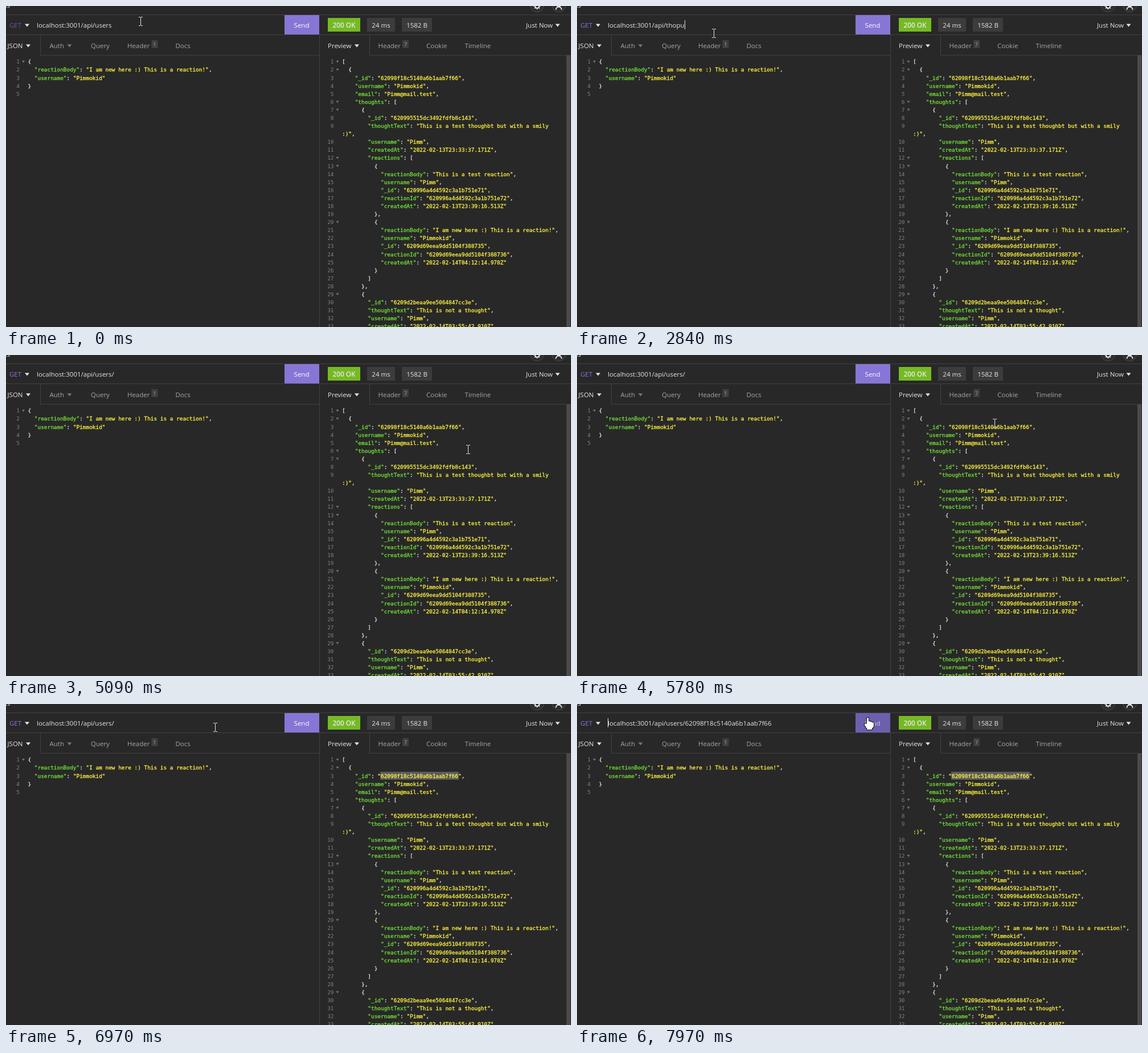
An HTML page with a canvas that plays this animation: 992 px wide and 564 px high, repeating every 8 s.

```html
<!DOCTYPE html>
<html lang="en">
<head>
<meta charset="utf-8">
<title>API client</title>
<style>
  html, body { margin: 0; width: 100%; height: 100%; overflow: hidden; background: #282828; }
  canvas { display: block; }
</style>
</head>
<body>
<canvas id="stage" width="992" height="564"></canvas>
<script>
const ctx = document.getElementById('stage').getContext('2d');
const LOOP = 8000;
const UI = '11.5px "Open Sans", "Noto Sans", sans-serif';
const UI_BOLD = '600 11.8px "Open Sans", "Noto Sans", sans-serif';
const BADGE = '9px "Open Sans", "Noto Sans", sans-serif';
const CODE = '9.42px "DejaVu Sans Mono", "Liberation Mono", monospace';
const CHAR = 5.67, ROW = 14.09, TOP = 98, SPLIT = 550;
const BAR = 16, TABS = 50, BODY = 87;
const COLOR = {
  bg: '#282828', line: '#414141', text: '#e6e6e6', dim: '#a6a6a6', num: '#808080',
  key: '#74e238', str: '#fff440', purple: '#8776d5', hover: '#6d5fae',
  green: '#75ba24', chip: '#3c3c3c', select: '#5b5b5b'
};

const ID = '62098f18c5140a6b1aab7f66';
const BASE = 'localhost:3001/api/';

const request = `{
  "reactionBody": "I am new here :) This is a reaction!",
  "username": "Pimmokid"
}
`.split('\n');

const response = `[
  {
    "_id": "${ID}",
    "username": "Pimmokid",
    "email": "Pimm@mail.test",
    "thoughts": [
      {
        "_id": "620995515dc3492fdfb8c143",
        "thoughtText": "This is a test thoughbt but with a smily
:)",
        "username": "Pimm",
        "createdAt": "2022-02-13T23:33:37.171Z",
        "reactions": [
          {
            "reactionBody": "This is a test reaction",
            "username": "Pimm",
            "_id": "620996a4d4592c3a1b751e71",
            "reactionId": "620996a4d4592c3a1b751e72",
            "createdAt": "2022-02-13T23:39:16.513Z"
          },
          {
            "reactionBody": "I am new here :) This is a reaction!",
            "username": "Pimmokid",
            "_id": "6209d69eea9dd5104f388735",
            "reactionId": "6209d69eea9dd5104f388736",
            "createdAt": "2022-02-14T04:12:14.978Z"
          }
        ]
      },
      {
        "_id": "6209d2beaa9ee5064847cc3e",
        "thoughtText": "This is not a thought",
        "username": "Pimm",
        "createdAt": "2022-02-14T03:55:42.910Z",`.split('\n');

// Typing bursts: letters shown grow or shrink evenly between start and end
const bursts = [
  { start: 0, word: 'users', to: 5 },
  { start: 1340, end: 2010, word: 'thopught', from: 2, to: 8 },
  { start: 2310, word: 'thopught', to: 7 },
  { start: 2810, end: 3040, word: 'thopught', from: 6, to: 1 },
  { start: 3200, word: '', to: 0 },
  { start: 3560, end: 4370, word: 'users/', from: 2, to: 6 },
  { start: 7210, word: 'users/' + ID, to: 30 }
];

// Pointer moves: [start, end, x, y]
const moves = [
  [460, 690, 240, 48], [4830, 4940, 346, 20], [4940, 5090, 811, 166],
  [5090, 5580, 733, 114], [5660, 5910, 733, 127], [6420, 6450, 700, 127],
  [6450, 7020, 336, 33], [7210, 7570, 428, 73], [7570, 7700, 452, 80],
  [7700, 7970, 510, 24]
];

const clamp01 = v => Math.min(1, Math.max(0, v));
const mix = (a, b, k) => a + (b - a) * k;

function textWidth(s) {
  ctx.font = UI;
  return ctx.measureText(s).width;
}

function label(s, x, y, color = COLOR.text, font = UI, align = 'left') {
  ctx.font = font;
  ctx.fillStyle = color;
  ctx.textAlign = align;
  ctx.fillText(s, x, y);
}

function box(x, y, w, h, color) {
  ctx.fillStyle = color;
  ctx.fillRect(x, y, w, h);
}

function triangle(x, y, w, h, color) {
  ctx.fillStyle = color;
  ctx.beginPath();
  ctx.moveTo(x - w / 2, y - h / 2);
  ctx.lineTo(x + w / 2, y - h / 2);
  ctx.lineTo(x, y + h / 2);
  ctx.fill();
}

function codeRow(s, x, y) {
  const token = /^:\)"|"[^"]*"?|[^"\s]+/g;
  for (const m of s.matchAll(token)) {
    const isKey = s[m.index + m[0].length] === ':';
    const color = !m[0].includes('"') ? COLOR.text : isKey ? COLOR.key : COLOR.str;
    const left = x + m.index * CHAR;
    label(m[0], left, y, color, CODE);
    ctx.strokeStyle = color;
    ctx.lineWidth = 0.3;
    ctx.strokeText(m[0], left, y);
  }
}

function editor(rows, x) {
  let n = 0;
  rows.forEach((s, i) => {
    const mid = TOP + i * ROW, y = Math.round(mid + 3.4);
    codeRow(s, x, y);
    if (s.startsWith(':)')) return;
    label(++n, x - 14.5, y, COLOR.num, CODE, 'right');
    if (/[{[]$/.test(s)) triangle(x - 8, mid, 5, 4, '#737373');
  });
}

function disc(x) {
  ctx.beginPath();
  ctx.arc(x, -1.5, 12, 0, 7);
  ctx.fillStyle = '#2d2d2d';
  ctx.fill();
  ctx.strokeStyle = '#4d4d4d';
  ctx.lineWidth = 1;
  ctx.stroke();
  ctx.strokeStyle = COLOR.text;
  ctx.lineWidth = 2;
  ctx.beginPath();
}

function gear(x) {
  disc(x);
  ctx.arc(x, 0, 3.6, 0, 7);
  for (let a = 0; a < 6; a += Math.PI / 4) {
    ctx.moveTo(x + Math.cos(a) * 4, Math.sin(a) * 4);
    ctx.lineTo(x + Math.cos(a) * 6, Math.sin(a) * 6);
  }
  ctx.stroke();
}

function person(x) {
  disc(x);
  ctx.arc(x, -2, 3, 0, 7);
  ctx.stroke();
  ctx.beginPath();
  ctx.arc(x, 6.5, 5, Math.PI, 0);
  ctx.stroke();
}

// Lays tabs out from left to right; a mark is a caret (v) or a count
function tabRow(x, tabs) {
  tabs.forEach(([name, mark], i) => {
    const color = i ? COLOR.dim : COLOR.text;
    label(name, x, 74, color);
    x += textWidth(name);
    if (mark === 'v') {
      triangle(x + 9.5, 70, 8, 5, i ? '#777' : color);
      x += 16;
    } else if (mark) {
      box(x + 3, 60, 11, 14, '#3f3f3f');
      label(mark, x + 8.5, 70.5, COLOR.dim, BADGE, 'center');
      x += 14;
    }
    x += 31;
  });
}

function tabLines(x, right) {
  box(x, TABS, 1, BODY - TABS, COLOR.line);
  box(x, BODY - 1, right - x, 1, COLOR.line);
}

function chip(s, x, w, color, font) {
  box(x, 21, w, 24, color);
  label(s, x + w / 2, 38, COLOR.text, font, 'center');
}

function frame() {
  box(0, 0, 992, 564, COLOR.bg);
  gear(932.5);
  person(970.5);
  label('ns', 7, 3, COLOR.text, UI, 'right');
  box(0, BAR - 1, 992, 1, COLOR.line);
  box(0, TABS, 992, 1, COLOR.line);
  box(SPLIT, TABS, 1, 514, COLOR.line);
  tabLines(60, SPLIT);
  tabLines(638, 992);
  box(984, BODY, 7, 477, '#4b4b4b');

  chip('200 OK', 565, 57, COLOR.green, UI_BOLD);
  chip('24 ms', 634, 49, COLOR.chip);
  chip('1582 B', 695, 53, COLOR.chip);
  label('Just Now', 913, 38);
  triangle(968.5, 34, 8, 5, COLOR.text);
  tabRow(2.5, [['JSON', 'v'], ['Auth', 'v'], ['Query'], ['Header', '1'], ['Docs']]);
  tabRow(565, [['Preview', 'v'], ['Header', '7'], ['Cookie'], ['Timeline']]);
}

function typed(t) {
  const { start, end, word, from = 0, to } = bursts.filter(b => b.start <= t).pop();
  const k = end ? clamp01((t - start) / (end - start)) : 1;
  return word.slice(0, Math.floor(mix(from, to, k)));
}

function address(t) {
  const tail = typed(t);
  const baseW = textWidth(BASE), fullW = textWidth(BASE + tail);
  const picked = t >= 690 && t < 1340;
  label('GET', 6, 38, t < 460 ? '#6457a3' : COLOR.purple);
  triangle(37, 34, 8, 5, COLOR.text);
  if (picked) box(54 + baseW, 25, fullW - baseW, 16, COLOR.select);
  label(BASE + tail, 54, 38);
  const focused = (t >= 580 && t < 4830 && !picked) || t >= 7020;
  if (focused) box(t >= 7960 ? 54 : Math.round(54 + fullW), 25, 1, 16, COLOR.text);
}

function pointerAt(t) {
  let x = 236, y = 27;
  for (const [start, end, toX, toY] of moves) {
    const k = clamp01((t - start) / (end - start));
    x = mix(x, toX, k);
    y = mix(y, toY, k);
  }
  return [x, y];
}

function ibeam(x, y) {
  x = Math.round(x);
  y = Math.round(y);
  box(x, y - 7, 1, 14, COLOR.text);
  for (const dy of [-8, 7]) {
    box(x - 3, y + dy, 3, 1, COLOR.text);
    box(x + 1, y + dy, 3, 1, COLOR.text);
  }
}

function arrow(x, y) {
  ctx.beginPath();
  ctx.moveTo(x, y);
  ctx.lineTo(x, y + 15);
  ctx.lineTo(x + 3.5, y + 12);
  ctx.lineTo(x + 6, y + 17.5);
  ctx.lineTo(x + 8.5, y + 16.5);
  ctx.lineTo(x + 6, y + 11);
  ctx.lineTo(x + 10.5, y + 11);
  ctx.closePath();
  ctx.fillStyle = '#fff';
  ctx.strokeStyle = '#111';
  ctx.lineWidth = 1;
  ctx.fill();
  ctx.stroke();
}

// Black pass one pixel larger gives the outline
function hand(x, y) {
  for (const [grow, color] of [[1, '#111'], [0, '#fff']]) {
    ctx.fillStyle = color;
    const part = (dx, dy, w, h) => {
      ctx.beginPath();
      ctx.roundRect(x + dx - grow, y + dy - grow, w + 2 * grow, h + 2 * grow, 1.5 + grow);
      ctx.fill();
    };
    part(-1, 0, 3, 14);
    for (let i = 1; i < 4; i++) part(i * 3 - 1, 5 + i, 3, 8);
    part(-5, 10, 4, 5);
    part(-3, 11, 13, 7);
    part(-1, 15, 9, 6);
  }
}

function pointer(t, x, y, onSend) {
  const inField = y >= BAR && y < TABS && x > SPLIT - 500;
  const overPick = t >= 6200 && t < 6520;
  if (onSend) hand(x, y);
  else if (!overPick && (inField || y > BODY)) ibeam(x, y);
  else arrow(x, y);
}

function draw(t) {
  const [x, y] = pointerAt(t);
  const onSend = x >= 489 && x < SPLIT && y >= BAR && y < TABS;
  frame();
  address(t);
  box(489, BAR, SPLIT - 489, TABS - BAR, onSend ? COLOR.hover : COLOR.purple);
  label('Send', 519, 38, onSend ? '#d0cbe6' : '#fff', UI, 'center');
  if (t >= 6140) box(657, 119, 138, 14, COLOR.select);
  editor(request, 38.5);
  editor(response, 590);
  pointer(t, x, y, onSend);
}

const start = performance.now();
function tick() {
  draw((performance.now() - start) % LOOP);
  requestAnimationFrame(tick);
}
tick();
</script>
</body>
</html>
```
